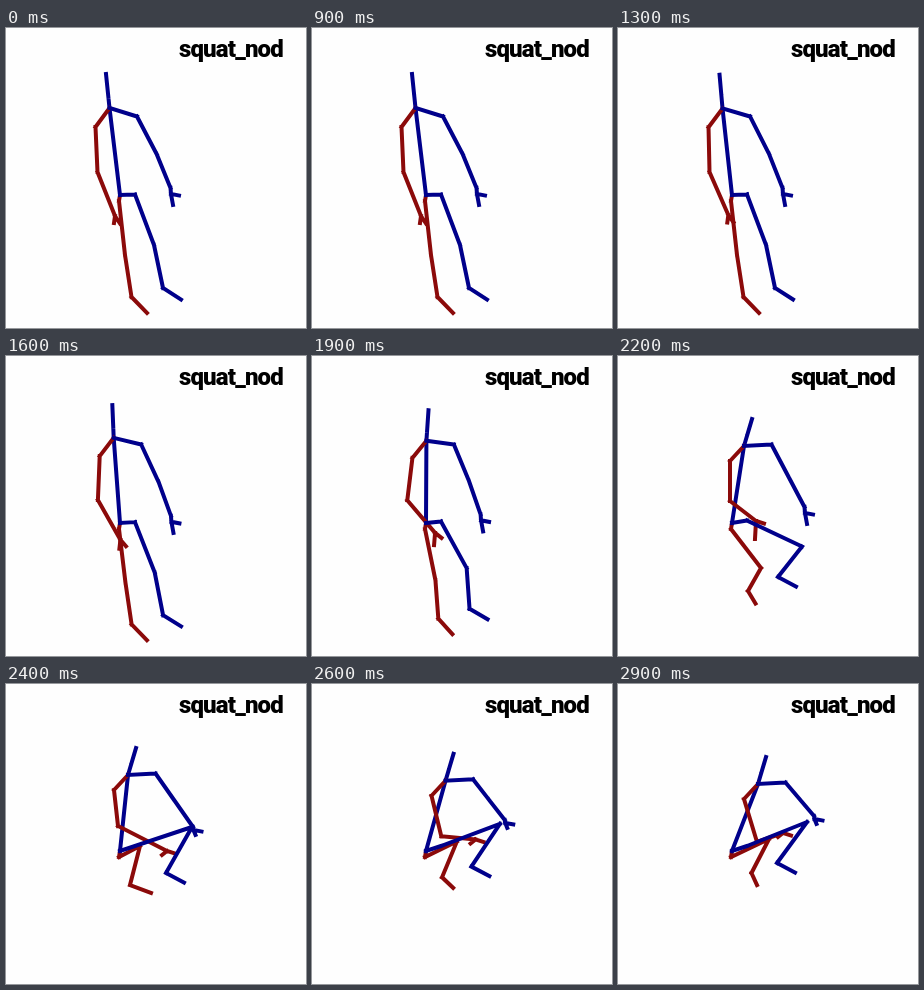
Recreate the animation shown at these times as an HTML page. Size 300 by 300 pixels, loop 3000 ms.

```html
<!DOCTYPE html>
<html lang="en">
<head>
<meta charset="utf-8">
<title>squat_nod</title>
<style>
  html, body { margin: 0; width: 100%; height: 100%; overflow: hidden; background: #fefefe; }
  svg { display: block; width: 100%; height: 100%; }
  path { fill: none; stroke: #00008b; stroke-width: 4; stroke-linecap: square; }
  .right { stroke: #8b0a0a; }
  text { font: 900 24px Roboto, "Open Sans", sans-serif; letter-spacing: -0.035em; }
</style>
</head>
<body>
<svg viewBox="0 0 300 300">
  <path id="rLeg" class="right"/>
  <path id="spine"/>
  <path id="rArm" class="right"/>
  <path id="lLeg"/>
  <path id="lArm"/>
  <text x="173" y="28.5">squat_nod</text>
</svg>
<script>
const LOOP = 3000, HOLD = 900, STEP = 100;
const SINK = 14, SQUAT = 16, END = 21;
const TRUNK = 3, LIMB = 7; // how late a part joins the descent

const add = ([x, y], dx, dy) => [x + dx, y + dy];
const mix = (a, b, u) => a.map((n, i) => n + (b[i] - n) * u);
const clamp = n => Math.min(1, Math.max(0, n));

// 0 standing, 1 sinking, 2 squatting, 3 leaning forward
function phase(step, lag) {
  if (step < SINK) return (step / SINK) ** lag;
  if (step < SQUAT) return 1 + (step - SINK) / (SQUAT - SINK);
  return 3 - ((END - step) / (END - SQUAT)) ** 2;
}

function along(p, ...points) {
  const i = Math.min(Math.floor(p), points.length - 2);
  return mix(points[i], points[i + 1], p - i);
}

function bones(...joints) {
  return joints.slice(1).map((end, i) => `M${joints[i]}L${end}`).join("");
}

function draw(step) {
  const body = phase(step, TRUNK), limb = phase(step, LIMB);
  const sink = clamp(body), fold = clamp(body - 1);

  const pelvis = [114, 167];
  const chest = along(body, [103.5, 80], [126, 90], [122, 91], [140, 100]);
  const head = add(chest, -3.5 + 11.5 * sink, -34 + 7 * sink);
  const neck = mix(chest, head, 0.35);

  const lShoulder = add(chest, 27.5, 8.5 - 10 * sink);
  const lWrist = along(limb, [164.5, 160], [186.5, 151], [187, 143], [196, 132]);
  const lElbow = add(mix(lShoulder, lWrist, 0.5), 3 - 3 * sink, 2 - 2 * sink);
  const lHand = add(lWrist, 0.5, 6 - 3 * fold);
  const lFinger = add(lHand, 2, 11 - 6 * fold);
  const lThumb = add(lHand, 8, 1.5);

  const rShoulder = add(chest, -14, 19 - 4 * sink);
  const rElbow = along(limb, [91.5, 144], [112, 145], [112, 142], [139, 158]);
  const rHand = along(body, [109, 188], [138, 165], [161, 167], [165, 149]);
  const rFinger = add(rHand, -1 - 4 * fold, 7 + 11 * sink - 14 * fold);
  const rThumb = add(rHand, 5 + 3 * sink, 7.5 - 5 * sink);

  const lHip = [129, 166.5 - 2 * sink - 2.5 * fold];
  const lKnee = along(limb, [148, 217], [184, 190.5], [186, 143], [189, 138]);
  const lAnkle = along(limb, [157, 260], [160, 221], [160, 189], [159, 179]);
  const lToe = add(lAnkle, 18, 11.5 - 2 * sink);

  const rHip = [113, 173];
  const rKnee = along(limb, [119, 227], [143, 212], [134, 162], [151, 155]);
  const rAnkle = along(limb, [125.5, 269], [130, 235], [124, 201], [133.5, 189]);
  const rToe = along(limb, [141, 285], [137.5, 247.5], [145, 209], [139, 201]);

  const parts = {
    rLeg: bones(pelvis, rHip, rKnee, rAnkle, rToe),
    spine: bones(pelvis, chest, neck, head),
    rArm: bones(chest, rShoulder, rElbow, rHand, rFinger) + bones(rHand, rThumb),
    lLeg: bones(pelvis, lHip, lKnee, lAnkle, lToe),
    lArm: bones(chest, lShoulder, lElbow, lWrist, lHand, lFinger) + bones(lHand, lThumb)
  };
  for (const id in parts) document.getElementById(id).setAttribute("d", parts[id]);
}

function tick(now) {
  const t = now % LOOP;
  draw(t < HOLD ? 0 : Math.floor((t - HOLD) / STEP) + 1);
  requestAnimationFrame(tick);
}
draw(0);
requestAnimationFrame(tick);
</script>
</body>
</html>
```
